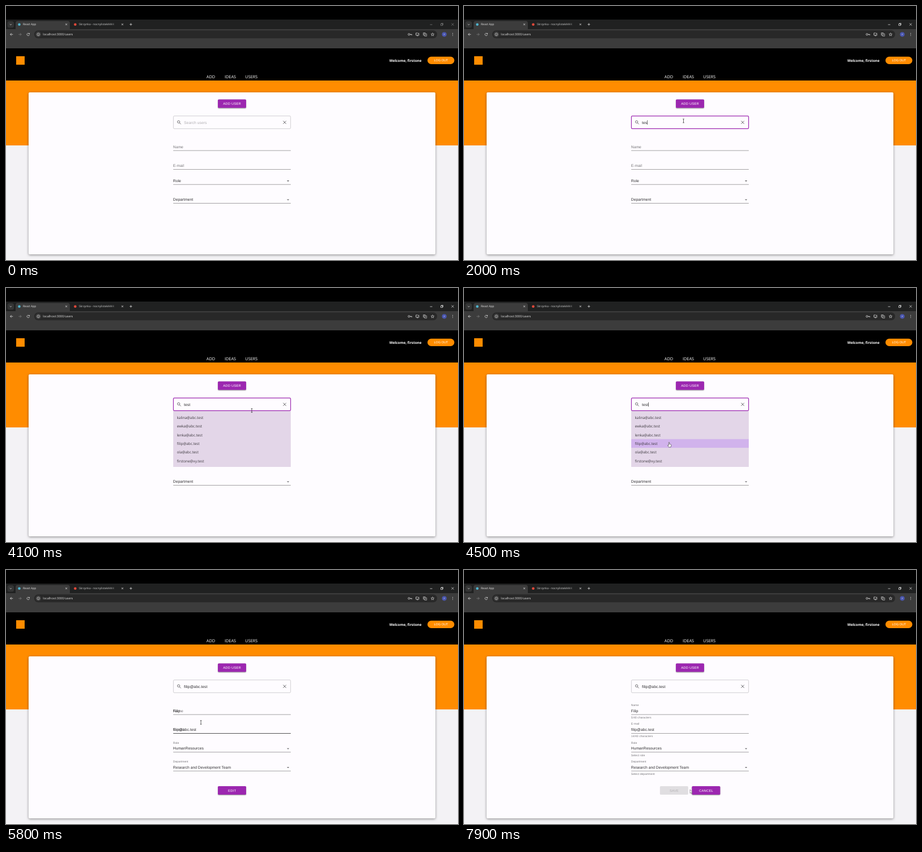
Recreate the animation shown at these times as an HTML page with a canvas. Size 800 px wide and 450 px high, loop 8000 ms.

```html
<!DOCTYPE html>
<html lang="en">
<head>
<meta charset="utf-8">
<title>User search</title>
<style>
html, body { margin: 0; width: 100%; height: 100%; overflow: hidden; background: #000; }
canvas { display: block; width: 800px; height: 450px; }
</style>
</head>
<body>
<canvas id="stage"></canvas>
<script>
const canvas = document.getElementById('stage');
const ctx = canvas.getContext('2d');
const dpr = window.devicePixelRatio || 1;
canvas.width = 800 * dpr;
canvas.height = 450 * dpr;

const LOOP = 8000;
const UI = '"Open Sans", "Noto Sans", sans-serif';
const FORM = '"Liberation Sans", Arial, sans-serif';
const PURPLE = '#9c27b0', ORANGE = '#ff8c00', INK = '#2b2a2c', MUTED = '#757477';
const LEFT = 296, RIGHT = 504;
const PICKED = 'filip@abc.test';
const EMAILS = ['kalina@abc.test', 'ewka@abc.test', 'lenka@abc.test', PICKED, 'ola@abc.test', 'firstone@xy.test'];
const KEYS = [1400, 1700, 2000, 2400];
const AT = { focus: 1000, list: 3300, blur: 5600, fill: 5800, edit: 7500 };

// time, x, y of the pointer
const PATH = [
  [100, 798, 300], [500, 560, 250], [900, 391, 205], [1000, 388.5, 203.5],
  [2550, 388.5, 203.5], [2700, 390, 204], [3250, 390, 204], [3650, 536, 214],
  [4100, 435, 217], [4500, 363, 273], [5000, 346, 270.5], [5100, 345, 270],
  [6450, 345, 270], [6800, 372.5, 294], [7300, 400, 389], [8000, 400, 389]
];

const clamp = v => Math.max(0, Math.min(1, v));
const mix = (a, b, k) => a + (b - a) * k;
const within = (v, a, b) => v >= a && v <= b;

function pointer(t) {
  let i = 1;
  while (i < PATH.length - 1 && t > PATH[i][0]) i++;
  const a = PATH[i - 1], b = PATH[i];
  const k = clamp((t - a[0]) / (b[0] - a[0]));
  const e = k * k * (3 - 2 * k);
  return { x: mix(a[1], b[1], e), y: mix(a[2], b[2], e) };
}

function rect(x, y, w, h, color) {
  ctx.fillStyle = color;
  ctx.fillRect(x, y, w, h);
}

function round(x, y, w, h, r, color) {
  ctx.beginPath();
  ctx.roundRect(x, y, w, h, r);
  ctx.fillStyle = color;
  ctx.fill();
}

function dot(x, y, r, color) {
  ctx.beginPath();
  ctx.arc(x, y, r, 0, 7);
  ctx.fillStyle = color;
  ctx.fill();
}

function shape(d, x, y, { stroke, fill, width = 0.8 } = {}) {
  ctx.save();
  ctx.translate(x, y);
  const p = new Path2D(d);
  if (fill) { ctx.fillStyle = fill; ctx.fill(p); }
  if (stroke) { ctx.strokeStyle = stroke; ctx.lineWidth = width; ctx.stroke(p); }
  ctx.restore();
}

function text(s, x, y, size, color, { font = FORM, weight = 400, align = 'left', space = 0 } = {}) {
  ctx.font = `${weight} ${size}px ${font}`;
  ctx.letterSpacing = space + 'px';
  ctx.textAlign = align;
  ctx.fillStyle = color;
  ctx.fillText(s, x, y + size * 0.36);
}

function shadow(blur, dy, color) {
  ctx.shadowBlur = blur * dpr;
  ctx.shadowOffsetY = dy * dpr;
  ctx.shadowColor = color;
}

function button(label, x, y, color = PURPLE, ink = '#fff') {
  ctx.save();
  if (color === PURPLE) shadow(1.6, 0.8, 'rgba(0,0,0,.4)');
  round(x, y, 50, 15.2, 1.7, color);
  ctx.restore();
  text(label, x + 25.1, y + 7.6, 5.9, ink, { align: 'center', space: 0.17 });
}

function browser(t) {
  const icon = { stroke: '#d8d8d8', width: 0.8 };
  const frame = { stroke: t < AT.focus ? '#858585' : '#f0f0f0', width: 0.7 };
  rect(0, 24, 800, 17, '#202121');
  rect(0, 41, 800, 34, '#3c3c3c');
  round(2.5, 27, 11.5, 11.5, 3.5, '#343535');
  shape('M-1.6 -.8 L0 .8 L1.6 -.8', 8.3, 32.8, icon);
  round(17, 26.5, 96, 18, 4, '#3c3c3c');
  dot(23.5, 32.7, 2.3, '#4eb5cf');
  text('React App', 30, 32.6, 5, '#e6e6e6', { font: UI });
  const cross = 'M-1.5 -1.5 L1.5 1.5 M1.5 -1.5 L-1.5 1.5';
  shape(cross, 106.7, 32.6, icon);
  dot(122.5, 32.7, 2.3, '#e5493a');

  const fade = ctx.createLinearGradient(184, 0, 199, 0);
  fade.addColorStop(0, '#d0d0d0');
  fade.addColorStop(1, 'rgba(208,208,208,0)');
  text('Skrzynka - nocnylistek4444', 129, 32.6, 5, fade, { font: UI });
  shape(cross, 206, 32.6, icon);
  shape('M-2.2 0 H2.2 M0 -2.2 V2.2', 221, 32.6, icon);

  shape('M-2 0 H2', 752.5, 33, frame);
  shape('M-2 -1 H1 V2 H-2 Z M-1 -1 V-2 H2 V1 H1', 771.5, 32.6, frame);
  shape('M-2 -2 L2 2 M2 -2 L-2 2', 790.5, 32.6, frame);

  round(50, 43.2, 713, 14, 7, '#282828');
  const arrow = 'M2.5 0 H-2.3 M0 -2.3 L-2.3 0 L0 2.3';
  shape(arrow, 9.8, 50.3, icon);
  ctx.save();
  ctx.translate(24.8, 50.3);
  ctx.scale(-1, 1);
  shape(arrow, 0, 0, { stroke: '#7c7c7c' });
  ctx.restore();
  shape('M1.8 -1.1 A2.2 2.2 0 1 0 2.1 .6 M2.3 -2.5 V-.8 H.6', 39.3, 50.3, icon);
  dot(57.3, 50.3, 5, '#3c3c3c');
  shape('M2.4 0 A2.4 2.4 0 1 1 -2.4 0 A2.4 2.4 0 1 1 2.4 0 M0 -.4 V1.4 M0 -1.4 V-.8', 57.3, 50.3, { stroke: '#dedede', width: 0.65 });
  text('localhost:3000/users', 65.3, 50.4, 5.5, '#e3e3e3', { font: UI });

  shape('M-.2 0 A1.6 1.6 0 1 1 -3.4 0 A1.6 1.6 0 1 1 -.2 0 H3.3 V1.5 M1.8 0 V1.3', 715, 50.3, icon);
  shape('M.5 -2.4 H-2.8 V1.4 H2.8 V.2 M-1.4 2.5 H1.4 M2 -2.8 V-.4 M.9 -1.4 L2 -.3 L3.1 -1.4', 728.3, 50.3, icon);
  shape('M-3 -2.8 H.5 V1.5 H-3 Z M.6 -1 H3 V3 H-.8 V1.6 M-2 -1.5 H-.4 M-1.2 -1.5 L-2 .4', 741.6, 50.3, { stroke: '#d8d8d8', width: 0.65 });
  shape('M0 -2.8 L.8 -.9 L2.8 -.8 L1.2 .5 L1.8 2.5 L0 1.4 L-1.8 2.5 L-1.2 .5 L-2.8 -.8 L-.8 -.9 Z', 755, 50.4, { stroke: '#d8d8d8', width: 0.65 });
  dot(775.7, 50.3, 4.1, '#4a56ae');
  text('P', 775.7, 50.3, 4, '#dfe2ff', { font: UI, align: 'center' });
  for (const dy of [-1.9, 0, 1.9]) dot(790.6, 50.3 + dy, 0.55, '#e0e0e0');
}

function page() {
  rect(0, 75, 800, 57, '#000');
  rect(0, 132, 800, 115, ORANGE);
  rect(0, 247, 800, 202, '#f3f2f5');
  rect(0, 449, 800, 1, '#fff');
  rect(18, 89, 15, 15, ORANGE);
  text('Welcome, firstone', 678.5, 97, 6.3, '#fff', { font: UI, weight: 700 });
  round(746, 89.8, 47.5, 13.2, 6.6, ORANGE);
  text('LOG OUT', 770, 96.5, 5.55, '#fff', { align: 'center' });
  [['ADD', 362.5], ['IDEAS', 397], ['USERS', 434.3]].forEach(([s, x]) =>
    text(s, x, 125.3, 7.3, '#fff', { font: UI, align: 'center' }));
  ctx.save();
  shadow(4, 1.2, 'rgba(0,0,0,.42)');
  round(40, 153, 720, 287, 2, '#fefcff');
  ctx.restore();
  button('ADD USER', 375, 165.4);
}

function searchBox(t) {
  const focused = within(t, AT.focus, AT.blur - 1);
  const typed = KEYS.filter(k => t >= k).length;
  const value = t >= AT.fill ? PICKED : 'test'.slice(0, typed);
  ctx.beginPath();
  ctx.roundRect(296.3, 194.8, 207.4, 22.6, 1.7);
  ctx.strokeStyle = focused ? PURPLE : '#c6c4c7';
  ctx.lineWidth = focused ? 1.2 : 0.8;
  ctx.stroke();
  shape('M1.3 -.8 A2.1 2.1 0 1 1 -2.9 -.8 A2.1 2.1 0 1 1 1.3 -.8 M.8 .8 L3.3 3.3', 306.3, 206.1, { stroke: '#68676a', width: 0.95 });
  shape('M-2.6 -2.6 L2.6 2.6 M2.6 -2.6 L-2.6 2.6', 493.2, 206.2, { stroke: '#555457', width: 0.9 });
  text(value || 'Search users', 315, 206.2, 6.75, value ? INK : '#b0aeb1', { space: 0.06 });
  if (focused && t < 4900) {
    const since = t - (typed ? KEYS[typed - 1] : AT.focus);
    const w = value ? ctx.measureText(value).width : 0;
    if (!typed || since % 1000 < 500) rect(315 + w, 202.3, 0.6, 8, '#222');
  }
}

function underline(y, hot) {
  rect(LEFT, y - 0.4, RIGHT - LEFT, 0.8, `rgba(0,0,0,${hot ? 0.85 : 0.45})`);
}

function fields(t) {
  const filled = t >= AT.fill, editing = t >= AT.edit;
  const k = 1 - (1 - clamp((t - AT.fill) / 200)) ** 3;
  const hoverY = pointer(t - 100).y;
  const rows = [
    ['Name', 'Filip', '5/40 characters'],
    ['E-mail', PICKED, '14/40 characters'],
    ['Role', 'HumanResources', 'Select role'],
    ['Department', 'Research and Development Team', 'Select department']
  ];
  rows.forEach(([label, value, hint], i) => {
    const y = 249.4 + i * 33.33;
    const select = i > 1;
    const shift = select && !filled ? -6.6 : 0;
    if (!select) {
      text(label, LEFT - 0.2, mix(y, y - 10.3, k), mix(6.67, 5, k), MUTED, { space: 0.06 });
    } else if (filled) {
      text(label, LEFT - 0.2, y - 10.3, 5, MUTED, { space: 0.06 });
    }
    if (filled) text(value, LEFT - 0.2, y, 6.67, INK, { space: 0.06 });
    else if (select) text(label, LEFT - 0.2, y + shift, 6.67, INK, { space: 0.06 });
    if (select) shape('M-2.1 -1 H2.1 L0 1.1 Z', 499.2, y + shift + 0.6, { fill: '#6a696c' });
    underline(y + shift + 6.7, filled && within(hoverY, y - 13, y + 7));
    if (editing) text(hint, LEFT - 0.2, y + 11.9, 5, MUTED, { space: 0.08 });
  });
  if (editing) {
    button('SAVE', 346.8, 382.9, '#e0dee1', '#b4b2b5');
    button('CANCEL', 403.4, 382.9);
  } else if (filled) {
    button('EDIT', 375, 382.9);
  }
}

function list(p) {
  const h = 15.4;
  rect(LEFT, 218, RIGHT - LEFT, 99, '#e3d6e8');
  EMAILS.forEach((mail, i) => {
    const top = 221.5 + i * h;
    if (within(p.x, LEFT, RIGHT) && p.y >= top && p.y < top + h) {
      rect(LEFT, top, RIGHT - LEFT, h, '#d1b3ec');
    }
    text(mail, 302.5, top + 8, 6.4, '#3a363c', { font: UI });
  });
}

function cursorKind(t, p) {
  const open = within(t, AT.list, AT.fill - 1);
  if (!within(p.x, LEFT, RIGHT)) return 'arrow';
  if (within(p.y, 194, 218)) return 'beam';
  if (open && within(p.y, 218, 317)) return 'hand';
  if (t >= AT.fill) {
    if (within(p.y, 269, 290)) return 'beam';
    if (within(p.y, 311, 323) || within(p.y, 344, 356)) return 'hand';
    if (t < AT.edit && within(p.y, 383, 398) && within(p.x, 375, 425)) return 'hand';
  }
  return 'arrow';
}

function cursor(t, p) {
  if (t < 100) return;
  const kind = cursorKind(t, p);
  if (kind === 'beam') {
    shape('M-1.3 -3.3 H1.3 M0 -3.3 V3.3 M-1.3 3.3 H1.3', p.x, p.y, { stroke: '#222', width: 0.7 });
  } else if (kind === 'hand') {
    shape('M-.7 .6 Q0 -.5 .7 .6 V3.6 L3.2 4.2 Q4 4.5 3.8 5.6 L3 9 H-.5 L-2.7 5.8 Q-2.4 4.7 -.7 5.8 Z', p.x, p.y, { fill: '#fff', stroke: '#333', width: 0.6 });
  } else {
    shape('M0 0 V6.6 L1.5 5.3 L2.5 7.5 L3.5 7 L2.5 4.9 H4.5 Z', p.x, p.y, { fill: '#fff', stroke: '#444', width: 0.5 });
  }
}

function draw(t) {
  const p = pointer(t);
  ctx.setTransform(dpr, 0, 0, dpr, 0, 0);
  ctx.textRendering = 'geometricPrecision';
  rect(0, 0, 800, 450, '#000');
  browser(t);
  page();
  searchBox(t);
  fields(t);
  if (within(t, AT.list, AT.fill - 1)) list(p);
  cursor(t, p);
}

const start = performance.now();
function tick() {
  draw((performance.now() - start) % LOOP);
  requestAnimationFrame(tick);
}
tick();
</script>
</body>
</html>
```
